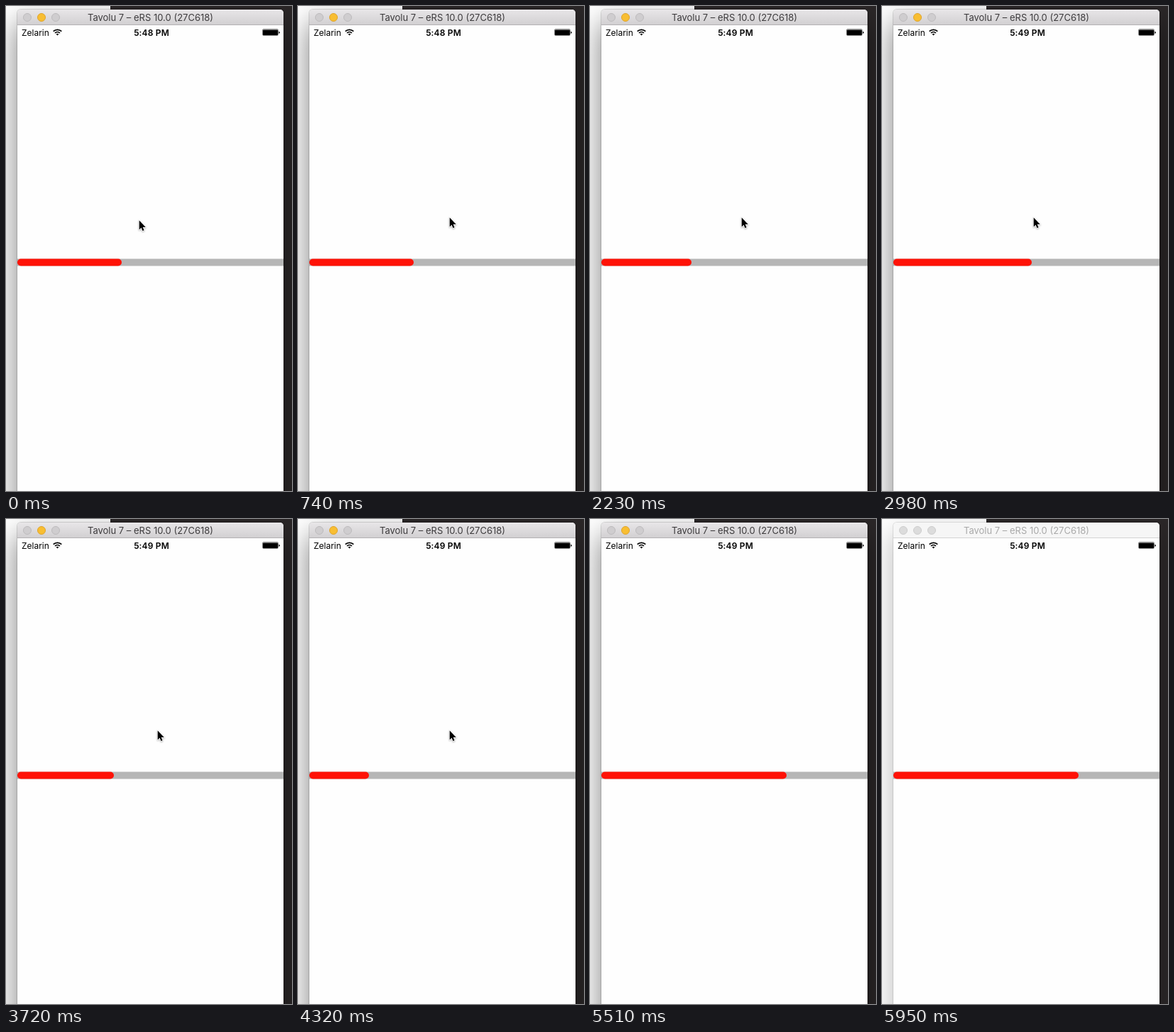
Write an HTML page that moves like this. It is 403x682 px and loops after 5970 ms.

```html
<!DOCTYPE html>
<html lang="en">
<head>
<meta charset="utf-8">
<title>Progress bar</title>
<style>
  html, body { margin: 0; width: 100%; height: 100%; overflow: hidden; background: #fff; }
  #stage { position: relative; width: 403px; height: 682px; overflow: hidden; font-family: Inter, Roboto, sans-serif; }
  #stage div, #stage svg { position: absolute; }
  #desk { left: 147px; top: 0; width: 256px; height: 682px; background: #2b2728; }
  #win {
    left: 16px; top: 5px; width: 375px; height: 740px;
    border-radius: 5px 5px 0 0; background: #fefefe;
    box-shadow: 0 0 0 1px rgba(0,0,0,.14), 0 18px 42px rgba(0,0,0,.52);
  }
  #title {
    left: 0; top: 0; width: 375px; height: 21px;
    border-radius: 5px 5px 0 0; border-bottom: 1px solid #b3b1b3;
    background: linear-gradient(#e8e6e8, #d2d0d2);
    color: #3d3b3d; font-size: 13px; line-height: 23px; text-align: center; white-space: pre;
  }
  .light {
    top: 5px; width: 12px; height: 12px; box-sizing: border-box;
    border-radius: 50%; border: 1px solid #bdbbbd; background: #cfcdcf;
  }
  .light.min { border-color: #dfa42c; background: #f8be32; }
  .inactive #win { box-shadow: 0 0 0 1px rgba(0,0,0,.1), 0 14px 40px rgba(0,0,0,.28); }
  .inactive #title { background: #f6f6f6; border-color: #d3d3d3; color: #a9a9a9; }
  .inactive #win .light { background: #dcdcdc; border-color: #cdcdcd; }
  .status { top: 30px; height: 15px; line-height: 15px; font-size: 12px; color: #000; white-space: pre; }
  #net { left: 22px; }
  #clock { left: 155px; width: 100px; text-align: center; font-weight: 600; letter-spacing: .15px; }
  #screen { left: 0; top: 0; }
  #cursor { filter: drop-shadow(0 1px 1px rgba(0,0,0,.3)); }
</style>
</head>
<body>
<div id="stage">
  <div id="desk"></div>
  <div id="win">
    <div id="title">Tavolu 7 – eRS 10.0 (27C618)</div>
    <div class="light" style="left:8px"></div>
    <div class="light min" style="left:28px"></div>
    <div class="light" style="left:48px"></div>
  </div>
  <div class="status" id="net">Zelarin</div>
  <div class="status" id="clock">5:48 PM</div>
  <svg id="screen" width="403" height="682">
    <g fill="none" stroke="#000" stroke-width="1.7">
      <path d="M66.7 35.7A8.2 8.2 0 0 1 78.3 35.7"/>
      <path d="M69 38A5 5 0 0 1 76 38"/>
    </g>
    <path d="M72.5 41.5L70.6 39.6A2.7 2.7 0 0 1 74.4 39.6Z"/>
    <rect x="361.5" y="32.5" width="22" height="9" rx="1.5" fill="none" stroke="#8c8c8c"/>
    <rect x="362" y="33.5" width="21" height="7.5" rx=".8"/>
    <path d="M384.4 35.5Q385.9 36 385.9 37.25T384.4 39Z"/>
    <rect x="16" y="355.5" width="375" height="10" fill="#b6b6b6"/>
    <rect id="fill" x="16" y="355.5" height="10" rx="5" ry="5" fill="#ff1207"/>
    <g id="cursor">
      <path d="M1.7 .4V13.4L4.6 10.7L6.5 15.2L8.6 14.3L6.7 9.9H10.8Z"
        stroke="#fff" stroke-width="1.6" stroke-linejoin="round" paint-order="stroke"/>
    </g>
  </svg>
</div>
<script>
  const LOOP = 5970, FRAME = 148.9;
  const CLOCK_TICK = 9, RESET = 10, GLIDE = 3, LEAVE = 34, GONE = 37, BLUR = 40;

  // Bar widths chosen at random by the app, in order; the third one is the reset.
  const widths = [147, 160, 5, 216, 127, 154, 195, 290, 136, 126, 84, 175, 261];

  const $ = id => document.getElementById(id);
  const stage = $('stage'), fill = $('fill'), clock = $('clock'), cursor = $('cursor');

  // Frame of the nth update: the gaps shorten steadily after the reset.
  const updateFrame = n => RESET + Math.round(2.8 * (n - 2) - .05 * (n - 2) ** 2);

  function barWidth(frame) {
    let n = 0;
    while (n + 1 < widths.length && frame >= updateFrame(n + 1)) n++;
    return widths[n];
  }

  // Two-frame ease-out; the vertical move settles faster than the horizontal one.
  function glide(frame, start, [x0, y0], [x1, y1]) {
    const left = 1 - Math.min(1, Math.max(0, (frame - start) / 2));
    const mix = (a, b, k) => Math.round(b + (a - b) * left ** k);
    return [mix(x0, x1, 1.85), mix(y0, y1, 3.4)];
  }

  const pointerAt = frame => frame < LEAVE
    ? glide(frame, GLIDE, [186, 301], [212, 297])
    : glide(frame, LEAVE, [213, 301], [315, 634]);

  function draw(t) {
    const frame = Math.floor((t + 10) / FRAME);
    fill.setAttribute('width', barWidth(frame));
    cursor.setAttribute('transform', `translate(${pointerAt(frame)})`);
    cursor.setAttribute('visibility', frame < GONE ? 'visible' : 'hidden');
    clock.textContent = frame < CLOCK_TICK ? '5:48 PM' : '5:49 PM';
    stage.classList.toggle('inactive', frame >= BLUR);
  }

  function tick() {
    draw(performance.now() % LOOP);
    requestAnimationFrame(tick);
  }
  tick();
</script>
</body>
</html>
```
